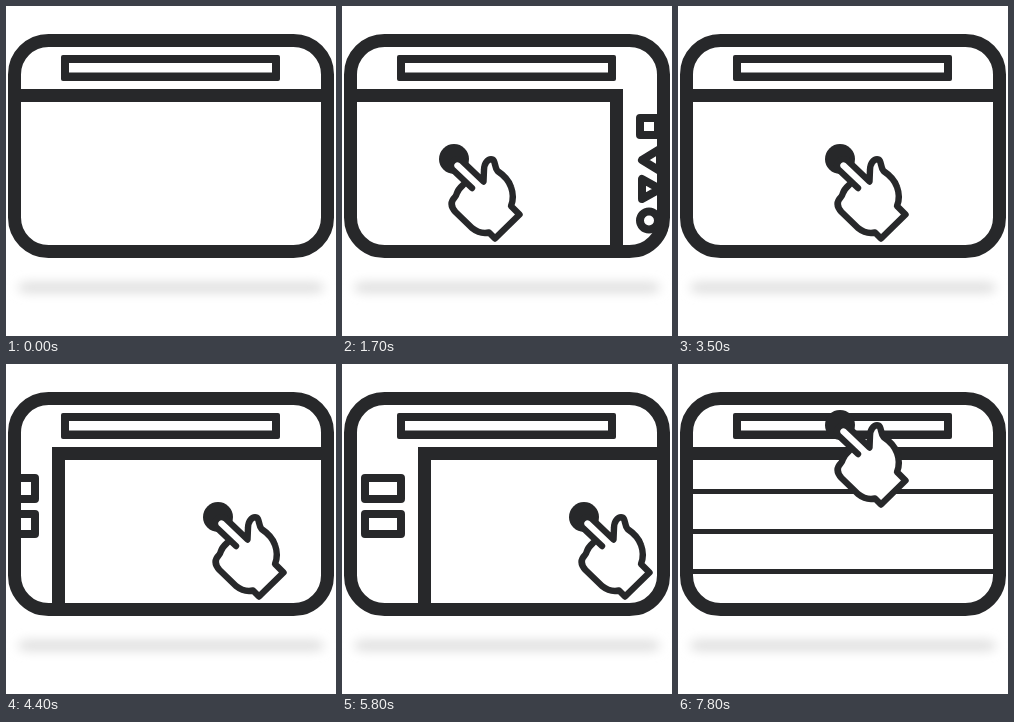
Write an HTML page that moves like this. It is 330 px wide and 330 px high and loops after 8 s.

```html
<!DOCTYPE html>
<html lang="en">
<head>
<meta charset="utf-8">
<title>Swipe and tap</title>
<style>
  html, body { margin: 0; width: 100%; height: 100%; overflow: hidden; background: #fff; }
  svg { display: block; width: 100%; height: 100%; }
  .line { fill: none; stroke: #27282a; }
  .icon { stroke-width: 8; stroke-linejoin: round; }
</style>
</head>
<body>
<svg viewBox="0 0 330 330">
  <defs>
    <filter id="soft" x="-10%" y="-150%" width="120%" height="400%">
      <feGaussianBlur stdDeviation="6 5"/>
    </filter>
    <clipPath id="inside"><rect x="4" y="30" width="322" height="220" rx="38"/></clipPath>
  </defs>

  <rect x="13" y="275" width="304" height="13" rx="6" fill="#e4e4e4" filter="url(#soft)"/>

  <g clip-path="url(#inside)">
    <rect x="55" y="49" width="219" height="26" rx="2" fill="#27282a"/>
    <rect x="63" y="57" width="203" height="9.5" fill="#fff"/>
    <g id="page" class="line">
      <path d="M2.5 270V89.5H324.5V270" stroke-width="13"/>
      <g class="icon">
        <rect x="-57" y="114" width="36" height="21"/>
        <rect x="-57" y="150" width="36" height="20"/>
        <rect x="348" y="112" width="18" height="17"/>
        <path d="M350 154L368 143V165Z"/>
        <path d="M368 183L350 173V193Z"/>
        <circle cx="357" cy="214.5" r="9"/>
      </g>
    </g>
    <path id="list" class="line" stroke-width="5" d="M10 127.5H320M10 167.5H320M10 207.5H320"/>
  </g>
  <rect class="line" x="8.5" y="34.5" width="313" height="211" rx="34" stroke-width="13"/>

  <g id="hand">
    <circle id="touch" cx="162" cy="153" r="15" fill="#27282a"/>
    <path fill="#fff" stroke="#27282a" stroke-width="6.4" stroke-linejoin="round" stroke-linecap="round"
      d="M180 182L160.5 163.5A6.4 6.4 0 0 1 169.5 154.5L191.5 175.5L192 164C192 157 196 153.2 199 153.2
         C204 153.2 202 161 205.5 165C213 170 217 175 219 181C222 189 221 195 219 200L227.5 208.5L203 232.5
         L197 226.5C190 228 185 226 180 222L163.5 206C158 200 159 195 163 191C166 188 163 186 171 179"/>
  </g>
</svg>
<script>
  const LOOP = 8000, STEP = 100;
  const el = id => document.getElementById(id);
  const page = el('page'), list = el('list'), hand = el('hand'), touch = el('touch');
  const show = (node, on) => node.setAttribute('visibility', on ? 'visible' : 'hidden');
  const move = (node, x, y) => node.setAttribute('transform', `translate(${x} ${y})`);

  function draw(t) {
    // Steps completed in a move that starts at `start` and takes `n` steps
    const steps = (start, n) => Math.max(0, Math.min(n, Math.floor((t - start) / STEP) + 1));

    const x = 10 * (steps(2900, 7) - steps(1300, 7) + steps(4000, 9) - steps(5800, 9));
    const y = 59 * (steps(500, 4) - 4) - 92 * steps(7100, 3) / 3;

    move(page, x, 0);
    move(hand, x, y);
    show(hand, t >= 500);
    show(touch, t >= 800 && t < 7100 || t >= 7800);
    show(list, t >= 7800);
  }

  const begin = performance.now();
  function tick() {
    draw((performance.now() - begin) % LOOP);
    requestAnimationFrame(tick);
  }
  tick();
</script>
</body>
</html>
```
